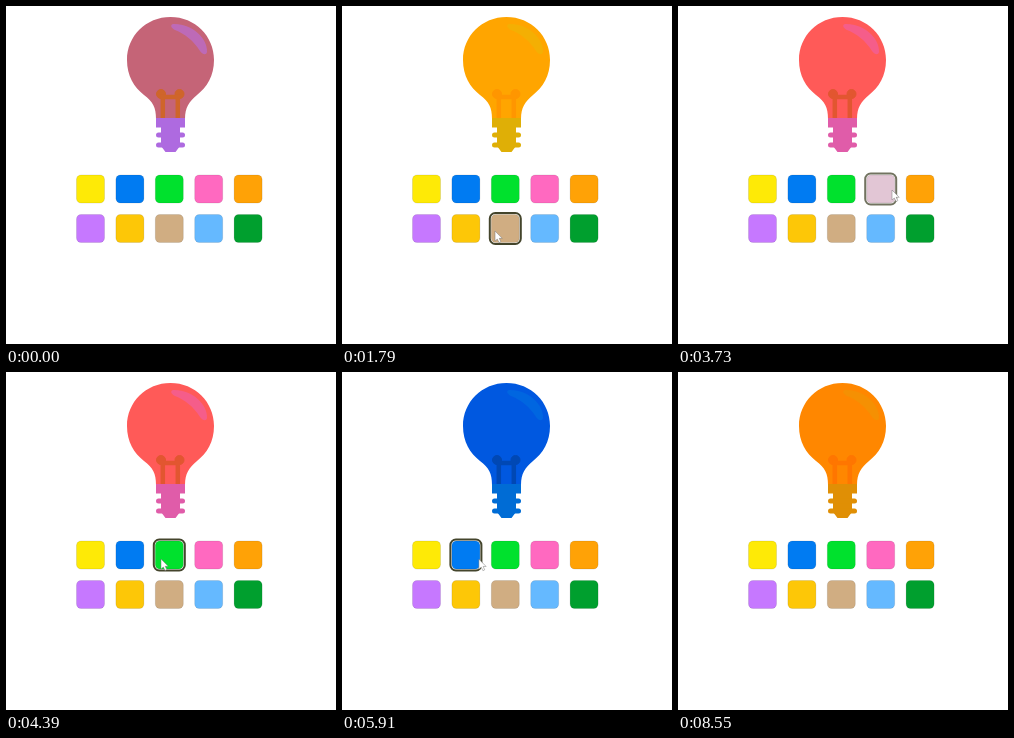
An HTML page that plays this animation: 330 by 338 pixels, repeating every 8610 ms.

```html
<!DOCTYPE html>
<html lang="en">
<head>
<meta charset="utf-8">
<title>Bulb colours</title>
<style>
html, body { margin: 0; width: 100%; height: 100%; overflow: hidden; background: #fff; }
svg { display: block; width: 330px; height: 338px; }
#bulb { --metal: color-mix(in srgb, var(--swatch), #000 12%); }
.glass { fill: var(--glass); }
.wire { fill: var(--wire); stroke: var(--wire); }
.shine { fill: color-mix(in srgb, var(--swatch), #000 7%); opacity: .55; }
.metal { fill: var(--metal); }
</style>
</head>
<body>
<svg viewBox="0 0 330 338">
  <g id="bulb">
    <path class="glass" d="M164.5 11C140 11 121 30 121 54C121 70 128 81 138 89C147 96 150 101 150 113H179C179 101 183 96 191 89C201 81 208 70 208 54C208 30 189 11 164.5 11Z"/>
    <g class="wire">
      <circle cx="155" cy="88" r="4.5"/><circle cx="173.5" cy="88" r="4.5"/>
      <path d="M156.8 112V91H171.8V112" fill="none" stroke-width="4.5"/>
    </g>
    <path class="shine" d="M167 18C185 17 202 32 201 46C200 50 196 48 194 45C187 34 179 28 169 24C165 22 164 19 167 18Z"/>
    <g class="metal">
      <path d="M150 112H179V121.5H150ZM155 121H174V140L169.5 146H159.5L155 140Z"/>
      <rect x="150" y="126.5" width="29" height="5" rx="2.5"/>
      <rect x="150" y="136.5" width="29" height="5" rx="2.5"/>
    </g>
  </g>
  <g id="swatches" stroke="#000" stroke-opacity=".16" stroke-width=".6"></g>
  <rect id="ring" width="31" height="31" rx="5.5" fill="none" stroke="#44452c" stroke-width="2"/>
  <path id="cursor" d="M0 0V10L2.3 8L4 11.5L5.8 10.6L4.2 7.3H7.2Z" fill="#fff" stroke="#777" stroke-width=".5"/>
</svg>
<script>
const $ = id => document.getElementById(id);
const LOOP = 8610, FADE = 70, GLIDE = 600, SIZE = 28;

const colours = {
  yellow: '#feea06', blue: '#007bf2', green: '#00e12d', pink: '#ff69c0', orange: '#ffa206',
  purple: '#c678ff', gold: '#fdc707', tan: '#d0ad82', sky: '#65b9ff', forest: '#009f2e'
};

// glass and wire for each chosen swatch
const looks = {
  purple: ['#c56477', '#cf652a'],
  gold: ['#ffa500', '#ff9600'],
  tan: ['#cf923c', '#d6820e'],
  sky: ['#2e8ff0', '#2676be'],
  pink: ['#ff5a58', '#e25630'],
  green: ['#00be14', '#00a41c'],
  blue: ['#0058e0', '#0048b4'],
  orange: ['#ff8700', '#ff7600']
};

// each stop of the pointer: click time, tip x and y, look
const stops = [
  [-250, 115, 244, 'purple'],
  [650, 115, 226, 'gold'],
  [2040, 156, 225, 'tan'],
  [2960, 195, 225, 'sky'],
  [3640, 214, 184, 'pink'],
  [4450, 155, 187, 'green'],
  [5500, 116, 187, 'blue'],
  [6500, 234, 188, 'orange'],
  [7850, 236, 315, 'orange']
];

const boxes = Object.values(colours).map((fill, i) => ({
  fill, x: 70.5 + 39.4 * (i % 5), y: i < 5 ? 169 : 208.5
}));
$('swatches').innerHTML = boxes.map(b =>
  `<rect x="${b.x}" y="${b.y}" width="${SIZE}" height="${SIZE}" rx="4.5"/>`).join('');

const clamp = v => Math.max(0, Math.min(1, v));
const ease = p => p * p * (3 - 2 * p);
const mix = (a, b, p) => a + (b - a) * p;
const blend = (a, b, p) => `color-mix(in srgb, ${a}, ${b} ${p * 100}%)`;

// rests after a click, then glides to the next stop shortly before its click
function pointer(t, [t0, x0, y0], [t1, x1, y1]) {
  const end = t1 - 150, begin = Math.max(t0 + 250, end - GLIDE);
  const p = ease(clamp((t - begin) / (end - begin)));
  return [mix(x0, x1, p), mix(y0, y1, p)];
}

function draw(t) {
  const n = stops.findLastIndex(s => s[0] <= t);
  const stop = stops[n], before = stops[Math.max(0, n - 1)][3], now = stop[3];
  const fade = clamp((t - stop[0]) / FADE);
  const paint = (name, a, b) => $('bulb').style.setProperty(name, blend(a, b, fade));
  paint('--swatch', colours[before], colours[now]);
  paint('--glass', looks[before][0], looks[now][0]);
  paint('--wire', looks[before][1], looks[now][1]);

  const [x, y] = pointer(t, stop, stops[n + 1] || stop);
  const over = boxes.find(b => x >= b.x && x < b.x + SIZE && y >= b.y && y < b.y + SIZE);
  const press = clamp(1 - Math.abs(t - stop[0] - 90) / 90);
  boxes.forEach((b, i) => {
    $('swatches').children[i].style.fill = blend(b.fill, '#dadfdb', b === over ? press * .8 : 0);
  });

  $('ring').setAttribute('opacity', over ? 1 - press * .25 : 0);
  $('cursor').setAttribute('opacity', over ? 1 : 0);
  if (over) {
    $('ring').setAttribute('x', over.x - 1.5);
    $('ring').setAttribute('y', over.y - 1.5);
    $('cursor').setAttribute('transform', `translate(${x} ${y})`);
  }
}

const start = performance.now();
function tick() {
  draw((performance.now() - start) % LOOP);
  requestAnimationFrame(tick);
}
tick();
</script>
</body>
</html>
```
